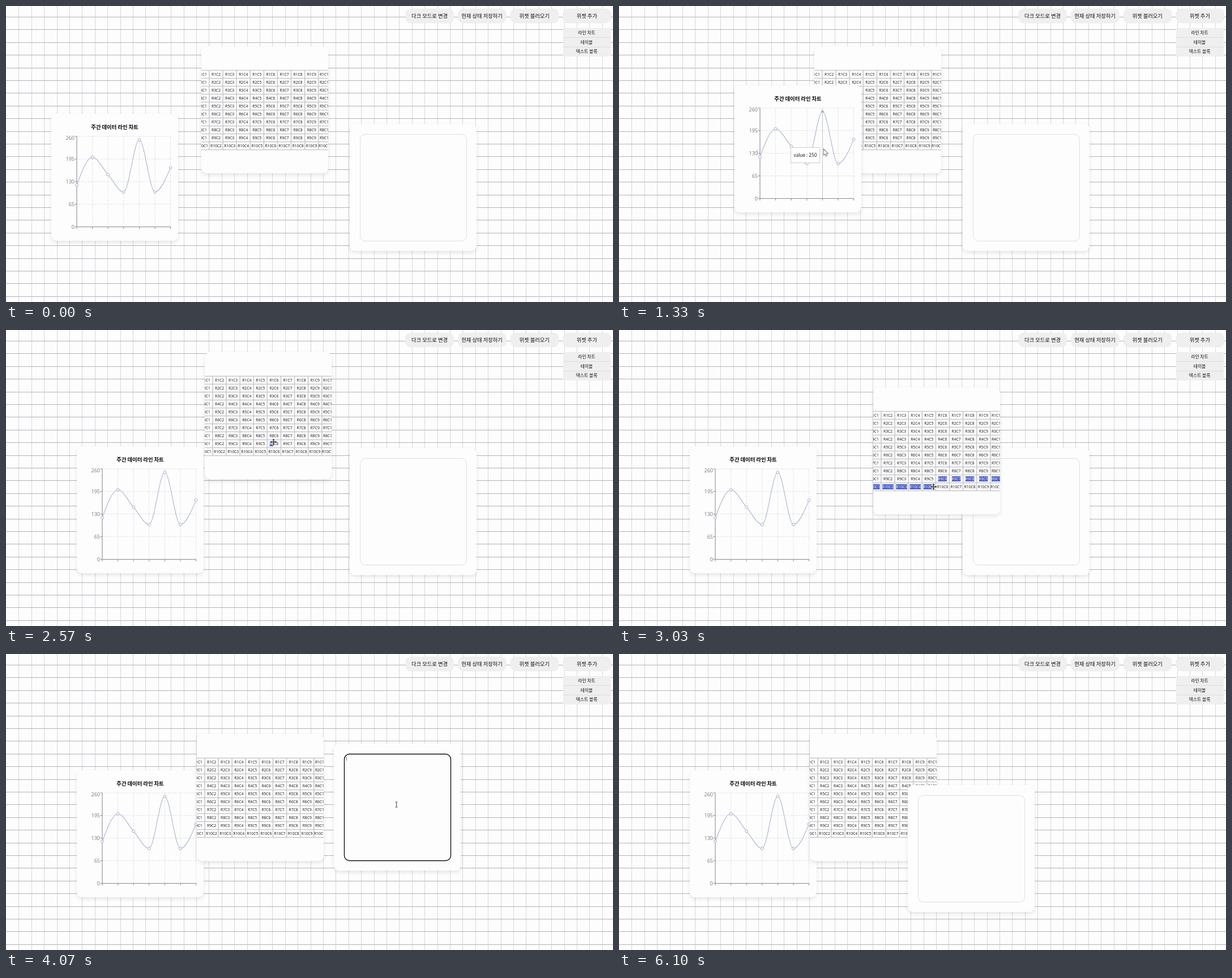
Animation, 1072 px wide and 522 px high, one loop 6.13 s. Source, as an HTML page with a canvas:

```html
<!DOCTYPE html>
<html lang="ko">
<head>
<meta charset="utf-8">
<style>
  html, body { margin: 0; width: 100%; height: 100%; overflow: hidden; background: #fdfdfd; }
  canvas { display: block; }
</style>
</head>
<body>
<canvas id="stage" width="1072" height="522"></canvas>
<script>
const ctx = document.getElementById('stage').getContext('2d');
const LOOP = 6130, SIZE = 224, PAPER = '#fdfdfd';
const HANGUL = '"Noto Sans CJK KR", "Noto Sans CJK JP", "Noto Sans CJK", sans-serif';
const LATIN = '"Open Sans", "Noto Sans", sans-serif';

// Drag paths as [time, x, y]
const chartPath = [[300, 80, 190], [520, 95, 240], [760, 175, 205], [1000, 215, 95], [1330, 204, 140],
  [1560, 215, 122], [1760, 170, 190], [1930, 125, 205]];
const tablePath = [[2450, 345, 71], [2570, 351, 39], [2700, 385, 24], [2880, 450, 45], [3030, 449, 101],
  [3130, 400, 160], [3230, 340, 138], [3360, 312, 95], [3560, 337, 141]];
const notePath = [[3960, 607, 208], [4070, 579, 158], [4230, 610, 124], [4430, 680, 180],
  [4650, 590, 265], [4930, 481, 222], [5130, 488, 226], [5330, 510, 231]];

const clamp = v => Math.max(0, Math.min(1, v));
const smooth = v => (v = clamp(v), v * v * (3 - 2 * v));
const mix = (a, b, p) => a.map((v, i) => v + (b[i] - v) * p);
const add = (a, b) => a.map((v, i) => v + b[i]);

// Cubic Hermite spline through the keys, at rest at both ends
function follow(path, t) {
  const last = path.length - 1;
  if (t <= path[0][0]) return path[0].slice(1);
  if (t >= path[last][0]) return path[last].slice(1);
  const i = path.findIndex(key => key[0] > t) - 1;
  const span = path[i + 1][0] - path[i][0], u = (t - path[i][0]) / span;
  const slope = (k, axis) => k === 0 || k === last ? 0
    : (path[k + 1][axis] - path[k - 1][axis]) / (path[k + 1][0] - path[k - 1][0]);
  return [1, 2].map(axis =>
    path[i][axis] + (path[i + 1][axis] - path[i][axis]) * smooth(u)
    + span * u * (1 - u) * (slope(i, axis) * (1 - u) - slope(i + 1, axis) * u));
}

function text(str, x, y, size, { color = '#111', align = 'center', weight = 400, font = LATIN } = {}) {
  ctx.font = `${weight} ${size}px ${font}`;
  ctx.textAlign = align;
  ctx.fillStyle = color;
  ctx.fillText(str, x, y + size * .36);
}

function box(x, y, w, h, r, fill, stroke, width = 1) {
  ctx.beginPath();
  ctx.roundRect(x, y, w, h, r);
  if (fill) { ctx.fillStyle = fill; ctx.fill(); }
  if (stroke) { ctx.strokeStyle = stroke; ctx.lineWidth = width; ctx.stroke(); }
}

function lines(segments, color, width = 1, dash = []) {
  ctx.beginPath();
  for (const [x1, y1, x2, y2] of segments) { ctx.moveTo(x1, y1); ctx.lineTo(x2, y2); }
  ctx.strokeStyle = color;
  ctx.lineWidth = width;
  ctx.setLineDash(dash);
  ctx.stroke();
  ctx.setLineDash([]);
}

function widget([x, y], draw) {
  ctx.save();
  ctx.translate(Math.round(x), Math.round(y));
  ctx.shadowColor = 'rgba(0,0,0,.1)';
  ctx.shadowBlur = 7;
  ctx.shadowOffsetY = 3;
  box(0, 0, SIZE, SIZE, 9, PAPER);
  ctx.shadowColor = 'transparent';
  ctx.clip();
  draw();
  ctx.restore();
}

function drawPage() {
  ctx.fillStyle = PAPER;
  ctx.fillRect(0, 0, 1072, 522);
  ctx.fillStyle = '#d6d6df';
  for (let x = 22.4; x < 1072; x += 22.4) ctx.fillRect(Math.round(x), 0, 1, 522);
  ctx.fillStyle = '#b3b3b8';
  for (let y = 19; y < 522; y += 22.4) ctx.fillRect(0, Math.round(y), 1072, 1);
}

function drawMenu() {
  ['다크 모드로 변경', '현재 상태 저장하기', '위젯 불러오기', '위젯 추가'].forEach((label, i) => {
    const x = 706 + i * 92.6;
    box(x, 5, 84.5, 25, 9, '#efefef', '#e8e8ea', .6);
    text(label, x + 42, 17.5, 9.3, { weight: 500, font: HANGUL });
  });
  box(984, 39, 84, 50, 0, '#efefef');
  ['라인 차트', '테이블', '텍스트 블록'].forEach((label, i) =>
    text(label, 1025.5, 47.2 + i * 16.7, 7.8, { font: HANGUL }));
  lines([[984, 55.5, 1068, 55.5], [984, 72.5, 1068, 72.5]], '#dcdce6');
}

const values = [120, 200, 150, 100, 250, 100, 170];
const tangents = [120, 0, -50, 0, 0, 0, 105];
const px = i => 45 + i * 27.6;
const py = v => 199.4 - v * 159.5 / 260;

function drawChart(hover) {
  text('주간 데이터 라인 차트', 112, 24, 9.3, { weight: 900, color: '#000', font: HANGUL });
  const ticks = [0, 65, 130, 195, 260];
  lines([...ticks.map(v => [45, py(v), 210.6, py(v)]), ...values.map((_, i) => [px(i), 40, px(i), 199])],
    '#d9d9dc', 1, [2, 2]);
  lines([[45, 40, 45, 199.5], [45, 199.5, 211, 199.5],
    ...ticks.map(v => [41.5, py(v), 45, py(v)]), ...values.map((_, i) => [px(i), 199.5, px(i), 203])], '#8b8b90');
  for (const v of ticks) text(v, 41, py(v) + (v === 260 ? 2.5 : 0), 9, { align: 'right', color: '#777' });
  if (hover) lines([[px(4), 40, px(4), 199], [40.5, 113, 40.5, 123]], '#c4c4c8');

  ctx.beginPath();
  ctx.moveTo(px(0), py(values[0]));
  for (let i = 1; i < values.length; i++)
    ctx.bezierCurveTo(px(i - 2 / 3), py(values[i - 1] + tangents[i - 1] / 3),
      px(i - 1 / 3), py(values[i] - tangents[i] / 3), px(i), py(values[i]));
  ctx.strokeStyle = '#a9b3d0';
  ctx.lineWidth = 1.1;
  ctx.stroke();
  values.forEach((v, i) => {
    const active = hover && i === 4, r = active ? 1.8 : 2.4;
    box(px(i) - r, py(v) - r, 2 * r, 2 * r, r, active ? '#a9b3d0' : '#fff', '#a3adc8');
  });
  if (hover) {
    box(99.5, 109.5, 51, 27, 0, '#fff', '#ccc');
    text('value : 250', 125, 123, 8.2);
  }
}

const colX = c => 1.9 + (c - 1) * 24.1;
const rowY = r => 49.5 + (r - 1) * 14;

// The selection starts in R9C6 and reaches the pointer in reading order
function drawTable(pointer) {
  const grid = [];
  for (let i = 0; i <= 10; i++) {
    grid.push([0, 42.5 + i * 14, SIZE, 42.5 + i * 14]);
    grid.push([colX(i) + 12.05, 42.5, colX(i) + 12.05, 182.5]);
  }
  lines(grid, '#c9c9ce', 1.6);
  const endRow = pointer && Math.max(9, Math.min(10, Math.round((pointer[1] - 49.5) / 14) + 1));
  for (let r = 1; r <= 10; r++) for (let c = 1; c <= 10; c++) {
    const label = `R${r}C${c}`;
    text(label, colX(c), rowY(r), 6.7);
    if (!pointer || r < 9 || r > endRow || (r === 9 && c < 6)) continue;
    const width = ctx.measureText(label).width, left = colX(c) - width / 2;
    const shown = r < endRow ? width : Math.min(width, pointer[0] - left);
    if (shown <= 0) continue;
    ctx.save();
    ctx.beginPath();
    ctx.rect(left, rowY(r) - 4.5, shown, 9);
    ctx.clip();
    ctx.fillStyle = '#4a5ec8';
    ctx.fillRect(left, rowY(r) - 4.5, shown, 9);
    text(label, colX(c), rowY(r), 6.7, { color: '#fff' });
    ctx.restore();
  }
}

function drawNote(focus) {
  box(18.5, 18.5, 188, 188, 9, null, '#dedfd6');
  if (!focus) return;
  ctx.globalAlpha = focus;
  box(18.5, 18.5, 188, 188, 9, null, '#111', 1.4);
  if (focus === 1) lines([[22.5, 23, 22.5, 30]], '#777');
  ctx.globalAlpha = 1;
}

const cursors = {
  arrow() {
    ctx.fill(shape('M0 0V10L2.4 8L4 12L5.6 11.3L4 7.5H7Z'));
  },
  move() {
    ctx.fill(shape('M0-6L2.2-3.2H.8V-.8H3.2V-2.2L6 0L3.2 2.2V.8H.8V3.2H2.2L0 6L-2.2 3.2H-.8V.8H-3.2V2.2L-6 0L-3.2-2.2V-.8H-.8V-3.2H-2.2Z'));
  },
  beam() {
    lines([[0, -4, 0, 4], [-2, -4.5, 2, -4.5], [-2, 4.5, 2, 4.5]], '#444');
  }
};

function shape(d) {
  const path = new Path2D(d);
  const solid = d.startsWith('M0-');
  ctx.strokeStyle = solid ? '#fff' : '#222';
  ctx.lineWidth = solid ? 1.6 : 1.2;
  ctx.stroke(path);
  ctx.fillStyle = solid ? '#333' : '#fff';
  return path;
}

function drawCursor(kind, [x, y]) {
  ctx.save();
  ctx.translate(Math.round(x) + .5, Math.round(y) + .5);
  cursors[kind]();
  ctx.restore();
}

function render(t) {
  const chart = follow(chartPath, t), table = follow(tablePath, t), note = follow(notePath, t);
  const tableGrip = mix([121, 158], [106, 175], smooth((t - 2570) / 460));
  const noteGrip = mix([110, 107], [125, 116], smooth((t - 4070) / 860));
  const handoffs = [
    [70, 290, add(chart, [157, 112])],
    [1950, 2420, add(table, tableGrip)],
    [3600, 3940, add(note, noteGrip)]
  ];
  const pointer = handoffs.reduce((pos, [from, to, goal]) =>
    mix(pos, goal, smooth((t - from) / (to - from))), [1050, 82]);

  const selecting = t > 2500 && t < 3950;
  const focus = t < 3950 ? 0 : clamp((6100 - t) / 100);
  const widgets = {
    chart: () => widget(chart, () => drawChart(t > 250 && t < 2000)),
    table: () => widget(table, () => drawTable(selecting && tableGrip)),
    note: () => widget(note, () => drawNote(focus))
  };
  // The widget taken last lies on top
  const order = t < 2450 ? ['note', 'table', 'chart'] : t < 3950 ? ['chart', 'note', 'table'] : ['chart', 'table', 'note'];

  drawPage();
  drawMenu();
  order.forEach(name => widgets[name]());
  if (t > 70 && t < 5530) drawCursor(t < 2330 ? 'arrow' : t < 3700 ? 'move' : t < 3850 ? 'arrow' : 'beam', pointer);
}

const start = performance.now();
function tick() {
  render((performance.now() - start) % LOOP);
  requestAnimationFrame(tick);
}
tick();
</script>
</body>
</html>
```
